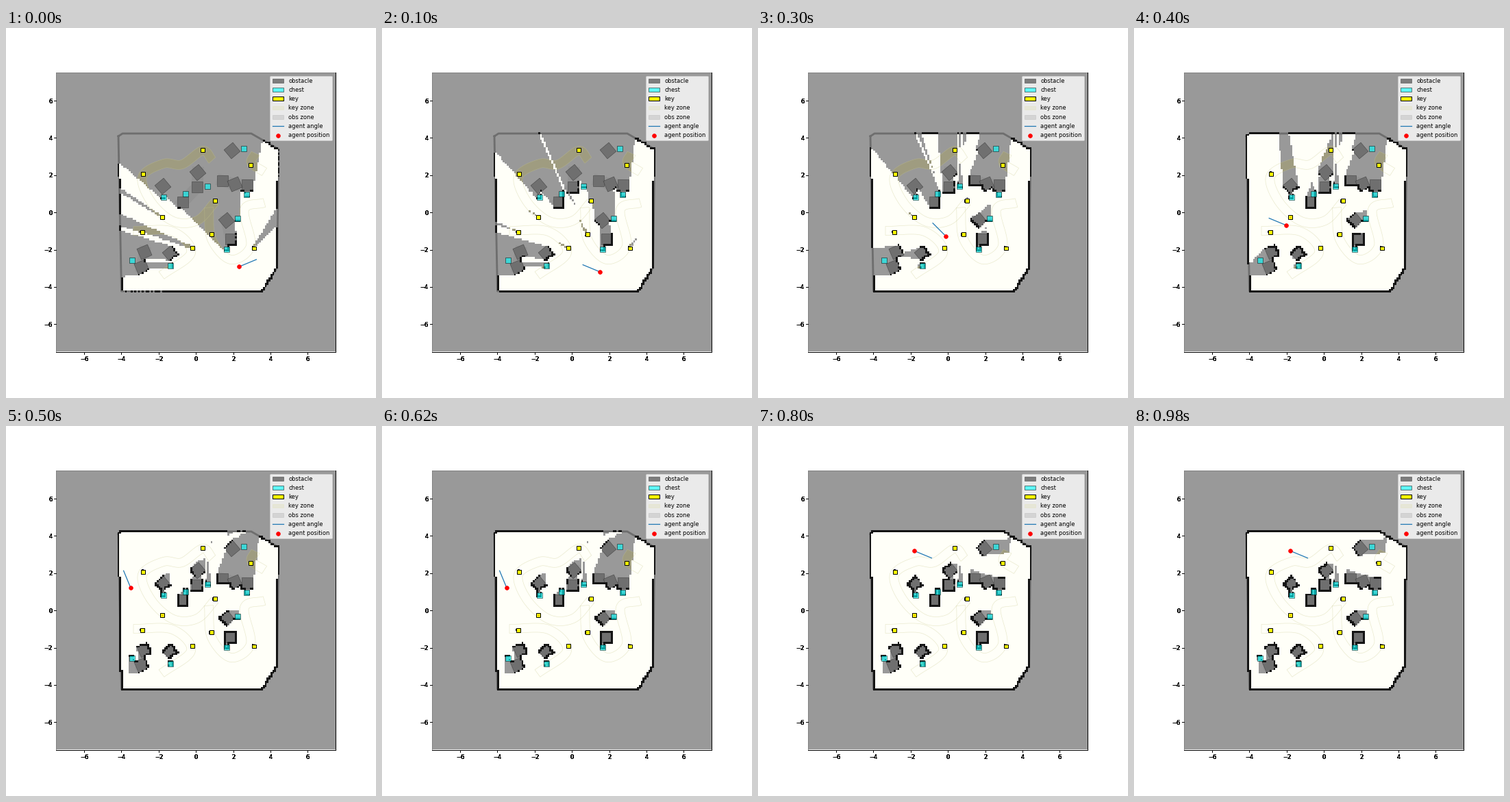
Recreate the animation shown at these times as a matplotlib script. Size 540 by 540 pixels, loop 1.1 s.

```python
import numpy as np
import matplotlib.pyplot as plt
from matplotlib.animation import FuncAnimation
from matplotlib.patches import Patch, Polygon

SIZE, DPI = 540, 60
HALF = 7.5
CELLS = 150
CENTRE = np.array([277.2, 269.2])
SCALE = 27.18

plt.rcParams["font.family"] = "DejaVu Sans"


def world(points):
    """Convert stage pixels to axis units."""
    return (np.asarray(points, float) - CENTRE) * [1, -1] / SCALE


# Centres in stage pixels, obstacles grouped by their tilt in degrees.
OBSTACLES = {
    0: [(279, 232), (258, 254), (316, 223), (352, 229), (328, 308)],
    23: [(334, 228), (202, 327), (198, 349)],
    40: [(330, 179), (229, 231), (280, 211), (322, 281), (240, 329)],
}
CHESTS = world([(347, 176), (351, 243), (294, 231), (262, 242), (230, 247),
                (338, 278), (322, 323), (184, 339), (240, 347)])
KEYS = world([(287, 178), (200, 213), (357, 200), (305, 252), (228, 276),
              (199, 298), (300, 301), (272, 321), (362, 321.5)])
WALL = world([(164, 158), (170, 154), (358, 154), (398, 177), (395.5, 350),
              (374, 384), (168.5, 384), (164, 158)])
KEY_ZONES = [
    [(301, 193), (287, 179), (257, 199), (230, 198), (199, 217),
     (212, 254), (244, 282), (279, 281), (305, 254)],
    [(296, 262), (300, 308), (328, 338), (357, 318), (348, 265), (377, 255)],
    [(186, 296), (243, 297), (270, 328), (227, 361)],
    [(364, 183), (358, 197), (377, 210)],
]
OBSTACLE_SIDE, CHEST_SIDE, KEY_SIDE = 0.62, 0.3, 0.2

# Agent poses: x, y in stage pixels, heading in eighths of pi, ticks held.
POSES = [
    (340.3, 348.3, 1, 1), (318.3, 356, 7, 2), (274.3, 304, 6, 1),
    (222.3, 288, 7, 1), (182, 236.3, 5, 2), (179.5, 187.3, 3, 1),
    (228.3, 182.3, -1, 3),
]
POSITIONS = world([pose[:2] for pose in POSES])
ANGLES = np.array([pose[2] for pose in POSES]) * np.pi / 8
HEADINGS = np.c_[np.cos(ANGLES), np.sin(ANGLES)]
TIMELINE = [i for i, pose in enumerate(POSES) for _ in range(pose[3])]


def hermite(p, q, u, v, t):
    """Curve from p to q with end tangents u and v."""
    t = t[:, None]
    return ((2 * t**3 - 3 * t**2 + 1) * p + (3 * t**2 - 2 * t**3) * q
            + (t**3 - 2 * t**2 + t) * u + (t**3 - t**2) * v)


def smooth(points):
    p = np.asarray(points, float)
    slope = np.gradient(p, axis=0)
    t = np.linspace(0, 1, 16, endpoint=False)
    legs = [hermite(*leg, t) for leg in zip(p, p[1:], slope, slope[1:])]
    return np.vstack(legs + [p[-1:]])


def band(points, half_width=6.5):
    curve = smooth(points)
    d = np.gradient(curve, axis=0)
    normal = np.c_[-d[:, 1], d[:, 0]] / np.hypot(*d.T)[:, None]
    offset = half_width * normal
    return world(np.vstack([curve + offset, (curve - offset)[::-1]]))


def square(centre, side, tilt=0):
    a = np.radians(tilt + 45 + 90 * np.arange(4))
    return centre + side / np.sqrt(2) * np.c_[np.cos(a), np.sin(a)]


def build_solid():
    c = -HALF + (np.arange(CELLS) + 0.5) * 2 * HALF / CELLS
    gx, gy = np.meshgrid(c, c)
    solid = np.zeros((CELLS, CELLS), bool)

    def add_squares(centres, side, tilt=0):
        cos, sin = np.cos(np.radians(tilt)), np.sin(np.radians(tilt))
        for x, y in centres:
            dx, dy = gx - x, gy - y
            u, v = dx * cos + dy * sin, dy * cos - dx * sin
            solid[np.maximum(abs(u), abs(v)) <= side / 2] = True

    for tilt, centres in OBSTACLES.items():
        add_squares(world(centres), OBSTACLE_SIDE + 0.04, tilt)
    add_squares(CHESTS, CHEST_SIDE)
    add_squares(KEYS, KEY_SIDE - 0.02)
    for a, b in zip(WALL, WALL[1:]):
        d = b - a
        t = ((gx - a[0]) * d[0] + (gy - a[1]) * d[1]) / (d @ d)
        t = np.clip(t, 0, 1)
        solid[np.hypot(gx - a[0] - t * d[0], gy - a[1] - t * d[1]) < 0.07] = 1
    return solid


def scan(solid, origin, rays=720):
    """Return the free and the hit cells seen from the origin."""
    angle = np.linspace(0, 2 * np.pi, rays, endpoint=False)[:, None]
    reach = np.arange(0, 11, 0.04)

    def cell(v):
        index = ((v + HALF) * CELLS / (2 * HALF)).astype(int)
        return np.clip(index, 0, CELLS - 1)

    col = cell(origin[0] + reach * np.cos(angle))
    row = cell(origin[1] + reach * np.sin(angle))
    first = solid[row, col].argmax(axis=1)
    before = np.arange(len(reach)) < first[:, None]
    free, hit = np.zeros_like(solid), np.zeros_like(solid)
    free[row[before], col[before]] = True
    each = np.arange(rays)
    hit[row[each, first], col[each, first]] = True
    return free, hit


def build_maps(scans_per_leg=7, tangent=2.4):
    """Map known at each pose, scanned all along the curved path."""
    solid = build_solid()
    image = np.zeros((CELLS, CELLS, 4))
    maps = []
    t = np.arange(1, scans_per_leg + 1) / scans_per_leg
    for i in range(len(POSES)):
        if i == 0:
            path = POSITIONS[:1]
        else:
            path = hermite(POSITIONS[i - 1], POSITIONS[i],
                           tangent * HEADINGS[i - 1], tangent * HEADINGS[i], t)
        for origin in path:
            free, hit = scan(solid, origin)
            image[free] = (1, 1, 0.975, 1)
            image[hit] = (0.08, 0.08, 0.08, 1)
        maps.append(image.copy())
    return maps


MAPS = build_maps()

fig = plt.figure(figsize=(SIZE / DPI, SIZE / DPI), dpi=DPI, facecolor="white")
side = 2 * HALF * SCALE
rect = np.array([CENTRE[0] - side / 2, SIZE - CENTRE[1] - side / 2,
                 side, side]) / SIZE


def add_axes():
    axes = fig.add_axes(rect, facecolor="none")
    axes.set(xlim=(-HALF, HALF), ylim=(-HALF, HALF),
             xticks=range(-6, 7, 2), yticks=range(-6, 7, 2))
    axes.spines[["top", "left"]].set_visible(False)
    return axes


ax = add_axes()
ax.set_facecolor("#999999")
ax.spines[["top", "left"]].set(visible=True, color="#777777")
for _ in range(6):  # stacked axes give the heavy tick labels
    add_axes()

ax.plot([-HALF, HALF], [-7.45, -7.45], color="white", lw=1.2, zorder=1)
ax.plot(*WALL.T, color="#6e6e6e", lw=3.4, zorder=1)

for points in KEY_ZONES:
    outline = band(points)
    ax.add_patch(Polygon(outline, fc="#9f9c80", ec="none", zorder=1))
    ax.add_patch(Polygon(outline, fill=False, ec="#c8c88c", alpha=0.4,
                         lw=0.8, zorder=2.5))

# Neighbouring obstacles share a zone.
centres = world(sum(OBSTACLES.values(), []))
for i, p in enumerate(centres):
    for q in centres[:i]:
        if np.hypot(*(p - q)) < 1.2:
            ax.plot(*np.c_[p, q], color="#929292", zorder=1,
                    lw=OBSTACLE_SIDE * SCALE * 72 / DPI)

grid = ax.imshow(MAPS[0], origin="lower", extent=(-HALF, HALF, -HALF, HALF),
                 interpolation="nearest", aspect="auto", zorder=2)

OBSTACLE = dict(fc="#696969", ec="#404040", alpha=0.85, lw=0.7)
CHEST = dict(fc=(0, 1, 1, 0.6), ec=(0, 0, 0, 0.65), lw=0.9)
KEY = dict(fc="yellow", ec="black", lw=1.2)

for tilt, group in OBSTACLES.items():
    for p in world(group):
        ax.add_patch(Polygon(square(p, OBSTACLE_SIDE, tilt),
                             zorder=1.5, **OBSTACLE))
for p in CHESTS:
    ax.add_patch(Polygon(square(p, CHEST_SIDE), zorder=3.1, **CHEST))
for p in KEYS:
    ax.add_patch(Polygon(square(p, KEY_SIDE), zorder=3.2, **KEY))
visited = ax.scatter(*KEYS[4], s=5, color="#f0a000", lw=0, zorder=3.3)

heading, = ax.plot([], [], color="#1f77b4", lw=1.5, zorder=4,
                   label="agent angle")
agent = ax.scatter([0], [0], s=46, color="red", zorder=4.1,
                   label="agent position")

ax.legend(handles=[
    Patch(label="obstacle", **OBSTACLE),
    Patch(label="chest", **CHEST),
    Patch(label="key", **KEY),
    Patch(label="key zone", color="y", alpha=0.08),
    Patch(label="obs zone", color="gray", alpha=0.2),
    heading, agent,
], loc="upper right", bbox_to_anchor=(0.9975, 1))


def update(tick):
    step = TIMELINE[tick]
    start = POSITIONS[step]
    grid.set_data(MAPS[step])
    heading.set_data(*np.c_[start, start + HEADINGS[step]])
    agent.set_offsets([start])
    visited.set_visible(step >= 3)
    return grid, heading, agent, visited


anim = FuncAnimation(fig, update, frames=len(TIMELINE), interval=100,
                     repeat=True, repeat_delay=0)
plt.show()
```
